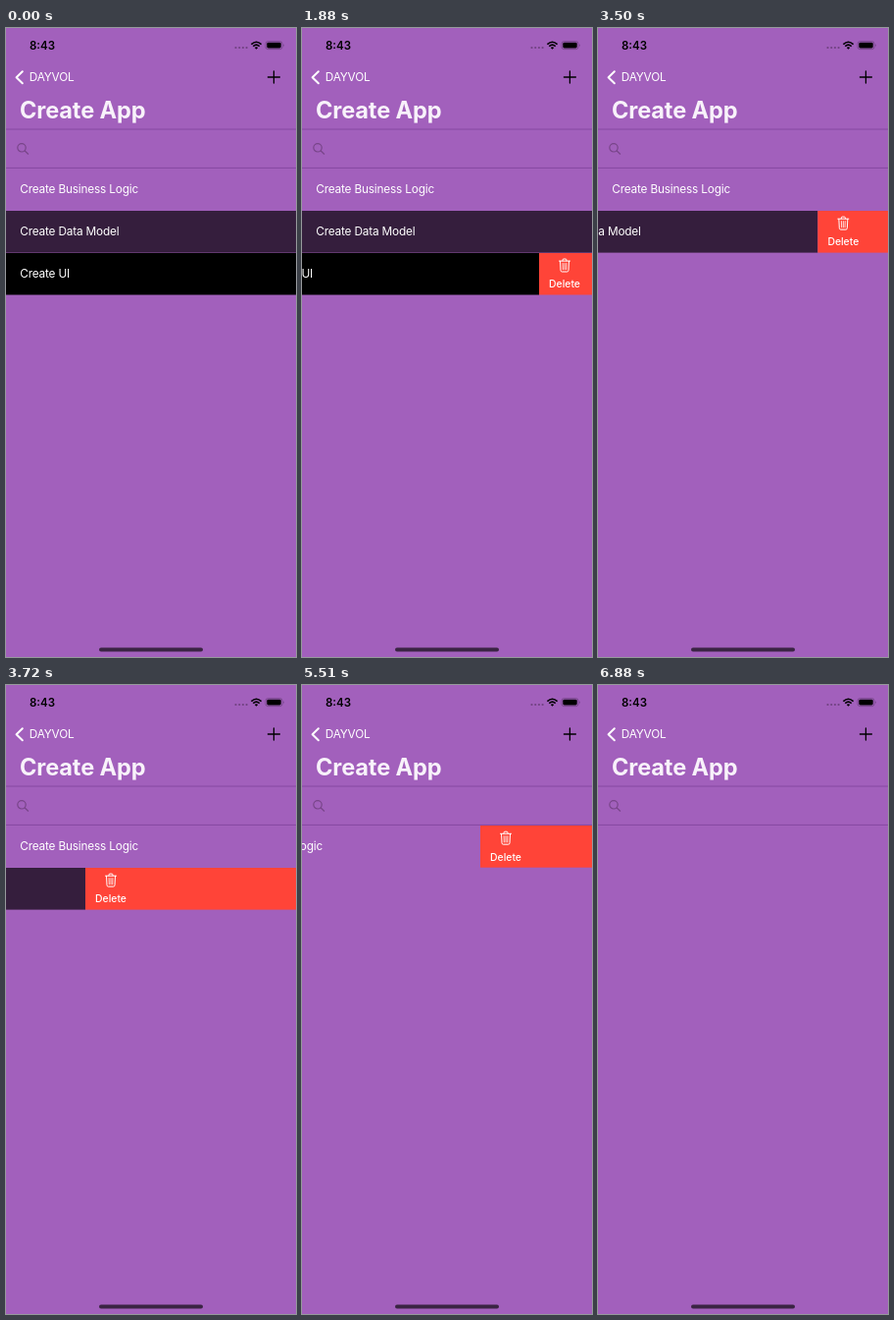
Recreate the animation shown at these times as an HTML page. Size 296 by 640 pixels, loop 6.98 s.

```html
<!DOCTYPE html>
<html lang="en">
<head>
<meta charset="utf-8">
<title>Swipe to delete</title>
<style>
  html, body { margin: 0; width: 100%; height: 100%; overflow: hidden; background: #a260bc; }
  svg { display: block; width: 296px; height: 640px; overflow: hidden; }
  text { font-family: Inter, "Liberation Sans", sans-serif; fill: #fff; }
  .time { font-size: 11.5px; font-weight: 600; fill: #000; }
  .title { font-size: 23.6px; font-weight: 700; letter-spacing: -.15px; fill: #f8f2fa; }
  .body { font-size: 11.8px; letter-spacing: -.17px; }
  .label { font-size: 10.4px; font-weight: 500; text-anchor: middle; }
  .line { fill: none; stroke-linecap: round; stroke-linejoin: round; }

  .row { animation: 6980ms step-end infinite; }
  .logic { animation-name: logic; }
  .model { animation-name: model; }
  .ui { animation-name: ui; }

  /* Each swipe advances in coarse steps; -900px takes a deleted row off stage. */
  @keyframes ui {
    0% { transform: translateX(0); }
    16.045% { transform: translateX(0); animation-timing-function: steps(8, start); }
    28.481% { transform: translateX(-54px); animation-timing-function: steps(4, start); }
    34.812% { transform: translateX(-295px); }
    34.813%, 100% { transform: translateX(-900px); }
  }
  @keyframes model {
    0% { transform: translateX(0); }
    50.143% { transform: translateX(0); animation-timing-function: steps(3, start); }
    54.857% { transform: translateX(-215px); }
    73.352%, 100% { transform: translateX(-900px); }
  }
  @keyframes logic {
    0% { transform: translateX(0); }
    73.352% { transform: translateX(-61px); }
    75.931% { transform: translateX(-61px); animation-timing-function: steps(3, start); }
    80.401% { transform: translateX(-114px); animation-timing-function: steps(7, start); }
    91.189% { transform: translateX(-295px); }
    98.567%, 100% { transform: translateX(-900px); }
  }
</style>
</head>
<body>
<svg viewBox="0 0 296 640" width="296" height="640">
  <defs>
    <g id="delete">
      <rect x="296" width="300" height="42.9" fill="#ff4438"/>
      <g class="line" stroke="#fff" stroke-width="1" transform="translate(322 12.8)">
        <path d="M-5.5 -4.3H5.5M-2 -4.5V-5.4Q-2 -6.4 -1 -6.4H1Q2 -6.4 2 -5.4V-4.5"/>
        <path d="M-4.5 -4.2L-4 5.2Q-3.9 6.6 -2.6 6.6H2.6Q3.9 6.6 4 5.2L4.5 -4.2"/>
        <path d="M-1.9 -1.9L-1.7 4.3M0 -1.9V4.3M1.9 -1.9L1.7 4.3" stroke-width=".8"/>
      </g>
      <text class="label" x="322" y="35.8">Delete</text>
    </g>
  </defs>

  <rect width="296" height="640" fill="#a260bc"/>

  <!-- status bar -->
  <text class="time" x="24" y="22">8:43</text>
  <g fill="#704282">
    <circle cx="234.5" cy="20" r="1.1"/>
    <circle cx="238.2" cy="20" r="1.1"/>
    <circle cx="241.9" cy="20" r="1.1"/>
    <circle cx="245.6" cy="20" r="1.1"/>
  </g>
  <g fill="none" stroke="#000" stroke-width="1.6">
    <path d="M250.4 16.6Q255.5 11.9 260.6 16.6"/>
    <path d="M252.3 18.6Q255.5 15.7 258.7 18.6"/>
  </g>
  <path d="M253.8 19.9Q255.5 18.5 257.2 19.9L255.5 21.7Z"/>
  <rect x="265" y="13.6" width="17" height="8" rx="2.4" fill="none" stroke="#704282" stroke-width=".8"/>
  <rect x="266.3" y="14.8" width="14.4" height="5.6" rx="1.4"/>
  <path d="M283 16.2Q284.6 17.6 283 19Z" fill="#704282"/>

  <!-- navigation bar -->
  <path class="line" d="M16.8 44.2L10.6 50.2L16.8 56.2" stroke="#fff" stroke-width="2"/>
  <text class="body" x="23.7" y="54.3">DAYVOL</text>
  <path class="line" d="M267.4 50H279.4M273.4 44V56" stroke="#000" stroke-width="1.3"/>
  <text class="title" x="14" y="91.6">Create App</text>

  <!-- search bar -->
  <path d="M0 103H296M0 142.4H296" stroke="#8648a2" stroke-width="1"/>
  <g class="line" stroke="#784589" stroke-width="1.2">
    <circle cx="16" cy="121.8" r="4.2"/>
    <path d="M19.2 125L22.6 128.2"/>
  </g>

  <g transform="translate(0 142.8)">
    <g class="row logic">
      <text class="body" x="14.2" y="25.7">Create Business Logic</text>
      <use href="#delete"/>
    </g>
  </g>
  <g transform="translate(0 185.7)">
    <g class="row model">
      <rect width="296" height="42.9" fill="#351e3d"/>
      <text class="body" x="14.2" y="25.7">Create Data Model</text>
      <use href="#delete"/>
    </g>
  </g>
  <g transform="translate(0 228.6)">
    <g class="row ui">
      <rect width="296" height="42.9"/>
      <text class="body" x="14.2" y="25.7">Create UI</text>
      <use href="#delete"/>
    </g>
  </g>

  <rect x="95" y="630.5" width="106" height="4" rx="2" fill="#3a2443"/>
</svg>
</body>
</html>
```
